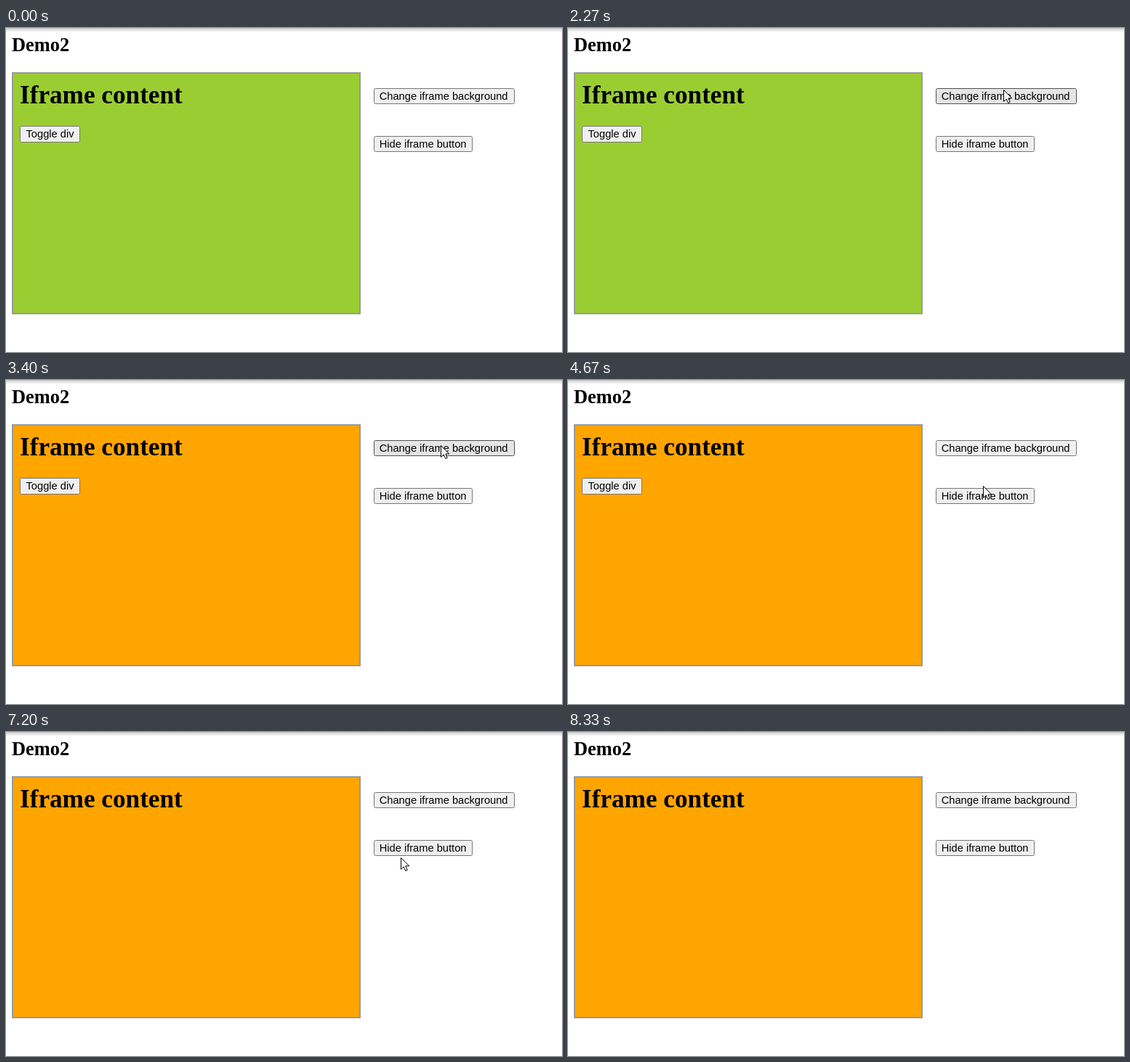
An HTML page for the animation above (8940 ms loop, 765 px wide and 447 px high).

```html
<!DOCTYPE html>
<html lang="en">
<head>
<meta charset="utf-8">
<title>Iframe demo</title>
<style>
  html, body { margin: 0; width: 100%; height: 100%; overflow: hidden; background: #fff; }
  svg { display: block; }
  .heading { font: bold 26.4px "Liberation Serif", "Times New Roman", serif; }
  .title { font-size: 35.2px; }
  .button text { font: 14.667px "Liberation Sans", Arial, sans-serif; }
</style>
</head>
<body>
<svg width="765" height="447" viewBox="0 0 765 447">
  <defs>
    <linearGradient id="shade" x2="0" y2="1">
      <stop offset="0" stop-color="#c4c4c4"/>
      <stop offset=".5" stop-color="#e6e6e6"/>
      <stop offset="1" stop-color="#fff"/>
    </linearGradient>
  </defs>
  <rect width="765" height="447" fill="#fff"/>
  <rect width="765" height="6" fill="url(#shade)"/>
  <text class="heading" x="8" y="32">Demo2</text>
  <rect id="frame" x="9" y="62" width="478" height="332" stroke="#999" stroke-width="2"/>
  <text class="heading title" x="19" y="104">Iframe content</text>
  <g id="buttons"></g>
  <path id="cursor" d="M.5 .5V16.5L4.2 12.9L6.7 18.5L9.2 17.4L6.8 11.9H11.7Z"
        fill="#fff" stroke="#000" stroke-linejoin="round"/>
</svg>
<script>
const LOOP = 8940;
const PRESS_MS = { change: [3330, 3400], hide: [6330, 6470] };
const STYLES = {
  normal: ["#efefef", "#767676"],
  hover: ["#e5e5e5", "#4f4f4f"],
  active: ["#f5f5f5", "#8d8d8d"]
};

// Cursor stops: [tick, x, y, easing used to get there]
const linear = p => p;
const easeIn = p => p ** 1.4;
const easeOut = p => 1 - (1 - p) ** 1.8;
const smooth = p => p * p * (3 - 2 * p);
const STOPS = [
  [19, 452, 424],
  [24, 337, 273, easeOut],
  [28, 337, 273, linear],
  [32, 601, 80, smooth],
  [33, 601, 80, linear],
  [36, 598, 90, easeOut],
  [64, 598, 90, linear],
  [72, 566, 156, smooth],
  [107, 566, 156, linear],
  [113, 281, 362, easeIn],
  [121, 66, 437, easeOut],
  [124, 56, 446, linear]
];

const $ = id => document.getElementById(id);

function svg(tag, attrs, parent) {
  const node = document.createElementNS("http://www.w3.org/2000/svg", tag);
  for (const key in attrs) node.setAttribute(key, attrs[key]);
  return parent.appendChild(node);
}

function makeButton(label, x, y, width, height, textX) {
  const group = svg("g", { class: "button" }, $("buttons"));
  const box = svg("rect", { x: x + .5, y: y + .5, width: width - 1, height: height - 1, rx: 2 }, group);
  svg("text", { x: textX, y: y + 16 }, group).textContent = label;
  return {
    group,
    contains: p => p && p.x >= x && p.x < x + width && p.y >= y && p.y < y + height,
    paint(state) {
      const [fill, stroke] = STYLES[state];
      box.setAttribute("fill", fill);
      box.setAttribute("stroke", stroke);
    }
  };
}

const toggle = makeButton("Toggle div", 19, 135, 83, 23, 27.5);
const change = makeButton("Change iframe background", 506, 83, 194, 22, 513.7);
const hide = makeButton("Hide iframe button", 506, 149, 136, 22, 513.7);
toggle.paint("normal");

function tickAt(time) {
  const tick = Math.floor((time + 5) * .015);
  return time < Math.round(tick * 100 / 15) * 10 ? tick - 1 : tick;
}

function cursorAt(tick) {
  if (tick < STOPS[0][0] || tick > STOPS.at(-1)[0]) return null;
  const i = Math.max(1, STOPS.findIndex(stop => stop[0] >= tick));
  const [t0, x0, y0] = STOPS[i - 1];
  const [t1, x1, y1, ease] = STOPS[i];
  const p = ease((tick - t0) / (t1 - t0));
  return { x: Math.round(x0 + (x1 - x0) * p), y: Math.round(y0 + (y1 - y0) * p) };
}

function buttonState(button, point, time, [down, up]) {
  if (time >= down && time < up) return "active";
  return button.contains(point) ? "hover" : "normal";
}

function render(time) {
  const point = cursorAt(tickAt(time));
  $("cursor").setAttribute("visibility", point ? "visible" : "hidden");
  if (point) $("cursor").setAttribute("transform", `translate(${point.x} ${point.y})`);
  $("frame").setAttribute("fill", time < PRESS_MS.change[1] ? "#9acd32" : "#ffa500");
  toggle.group.setAttribute("visibility", time < PRESS_MS.hide[1] ? "visible" : "hidden");
  change.paint(buttonState(change, point, time, PRESS_MS.change));
  hide.paint(buttonState(hide, point, time, PRESS_MS.hide));
}

const start = performance.now();
function loop() {
  render((performance.now() - start) % LOOP);
  requestAnimationFrame(loop);
}
render(0);
requestAnimationFrame(loop);
</script>
</body>
</html>
```
